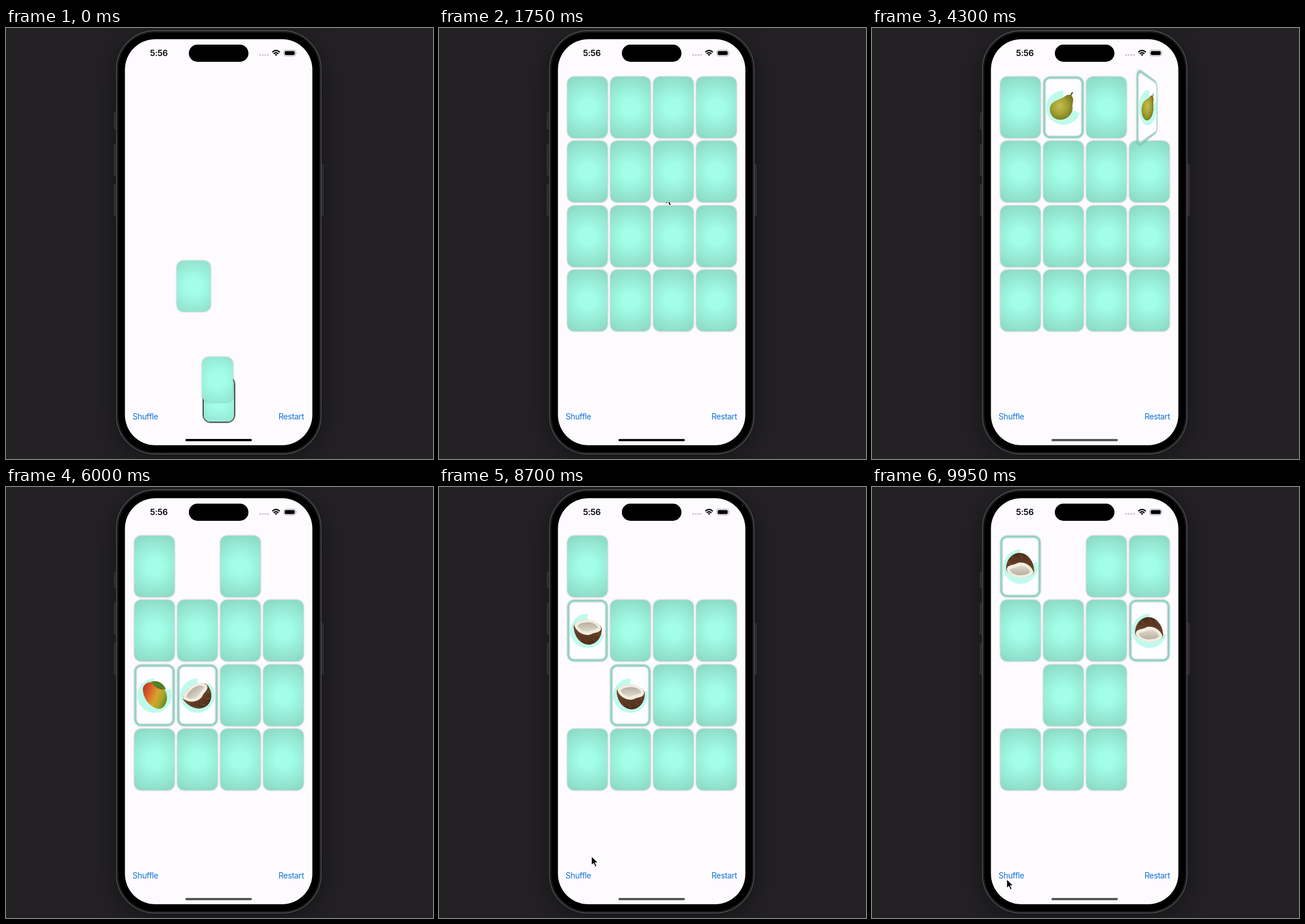
An HTML page that plays this animation: 745x752 px, repeating every 10 s.

```html
<!DOCTYPE html>
<html lang="en">
<head>
<meta charset="utf-8">
<title>Memory cards</title>
<style>
  html, body { margin: 0; width: 100%; height: 100%; overflow: hidden; background: #232124; }
  #stage { position: relative; width: 745px; height: 752px; overflow: hidden; }
  #stage > svg { position: absolute; left: 0; top: 0; }
  #glow { position: absolute; left: 193px; top: 5px; width: 356px; height: 738px; border-radius: 68px;
    box-shadow: 0 10px 50px rgba(0, 0, 0, .42); }
  text { font-family: Inter, Roboto, sans-serif; }
  .link { font-size: 14px; letter-spacing: -.33px; fill: #1173d4; }
  .card { position: absolute; border-radius: 12px; box-sizing: border-box;
    background: radial-gradient(circle, #a2fee7 14px, #89d4c1 65px);
    box-shadow: 0 0 3px rgba(0, 0, 0, .36); }
  .face { position: absolute; inset: 0; border-radius: 12px; box-sizing: border-box; overflow: hidden;
    border: 3.5px solid #8ad6c3; background: #fefdff; }
  .face::after { content: ""; position: absolute; inset: 0; border-radius: 8px;
    box-shadow: inset 0 0 3px rgba(0, 0, 0, .42); }
  .pie, .fruit { position: absolute; left: 50%; top: 50%; width: 60px; height: 60px; margin: -30px; }
  .pie { border-radius: 50%; }
  .fruit { overflow: visible; }
</style>
</head>
<body>
<div id="stage">
  <div id="glow"></div>
  <svg width="745" height="752">
    <defs>
      <linearGradient id="mangoSkin" x1="0" y1=".25" x2="1" y2=".75">
        <stop offset="0" stop-color="#c23a22"/><stop offset=".3" stop-color="#db6a2a"/>
        <stop offset=".55" stop-color="#d9a32c"/><stop offset=".78" stop-color="#a5a52a"/>
        <stop offset="1" stop-color="#5d7f1c"/>
      </linearGradient>
      <radialGradient id="pearSkin" cx=".42" cy=".45" r=".62">
        <stop offset="0" stop-color="#c2bd52"/><stop offset=".5" stop-color="#a5a233"/>
        <stop offset="1" stop-color="#74751b"/>
      </radialGradient>
      <linearGradient id="husk" x1="0" y1="0" x2="0" y2="1">
        <stop offset="0" stop-color="#805336"/><stop offset="1" stop-color="#4c2c1a"/>
      </linearGradient>
      <linearGradient id="hollow" x1="0" y1="0" x2="0" y2="1">
        <stop offset="0" stop-color="#b5b0a0"/><stop offset="1" stop-color="#ded9cb"/>
      </linearGradient>
      <g id="mango">
        <path d="M-20-8C-22-20-10-26 1-23C14-19 22-8 22 4C21 16 15 24 6 23C-4 21-18 10-20-8Z" fill="url(#mangoSkin)"/>
        <path d="M-6-24C4-28 15-23 20-11C9-9 2-14-6-24Z" fill="#4b7a22"/>
        <path d="M-6-24Q6-20 19-11" fill="none" stroke="#7da548" stroke-width=".8"/>
      </g>
      <g id="pear">
        <path d="M12-18Q13-23 16-27" fill="none" stroke="#67502c" stroke-width="2.4"/>
        <path d="M4-21C10-25 17-21 17-14C17-9 15-5 16 1C15 13 5 22-7 21C-19 20-26 9-23-2C-19-13-6-13 4-21Z" fill="url(#pearSkin)"/>
      </g>
      <g id="coconut" transform="rotate(-37)">
        <path d="M-24-9C-24 12-10 25 3 24C16 23 26 10 25-5C18-22-18-24-24-9Z" fill="url(#husk)"/>
        <path d="M-23-10C-18-20-8-18-1-20C10-20 22-14 24-5C23 4 13 2 6 6C-3 10-19 4-23-10Z" fill="#f0ece0"/>
        <path d="M-17-9C-12-15-5-14 2-15C11-14 17-11 19-5C14-2 8-2 3 1C-5 3-14-1-17-9Z" fill="url(#hollow)"/>
        <path d="M-17 11l7 7M-4 15l5 7M9 13l6 5M17 4l4 5" stroke="#8a6040" stroke-width=".8"/>
      </g>
    </defs>

    <g fill="#2b292c" stroke="#434145" stroke-width=".7">
      <rect x="188.5" y="148" width="8" height="28" rx="1.5"/>
      <rect x="188.5" y="203" width="8" height="54" rx="1.5"/>
      <rect x="188.5" y="273" width="8" height="54" rx="1.5"/>
      <rect x="545" y="238" width="8.5" height="89" rx="1.5"/>
    </g>
    <rect x="192.7" y="4.7" width="357" height="738.6" rx="67" fill="#19181a" stroke="#59585b" stroke-width="1.2"/>
    <rect x="196" y="8" width="350.5" height="732" rx="64"/>
    <rect x="207.5" y="19.5" width="327" height="708.5" rx="53" fill="#fdfbfe"/>
    <rect x="319" y="29" width="104" height="30" rx="15"/>

    <text x="251.3" y="49" font-size="14.6" font-weight="600" letter-spacing="-.3">5:56</text>
    <g fill="#c3c2c4">
      <circle cx="443.5" cy="47" r="1.6"/><circle cx="448" cy="47" r="1.6"/>
      <circle cx="452.5" cy="47" r="1.6"/><circle cx="457" cy="47" r="1.6"/>
    </g>
    <g fill="none" stroke="#000" stroke-width="2.1">
      <path d="M464.6 42.2Q471.2 36.2 477.8 42.2M467 45Q471.2 41.3 475.4 45"/>
      <path d="M468.9 46.3Q471.2 44.6 473.5 46.3L471.2 48.7Z" fill="#000" stroke="none"/>
    </g>
    <rect x="484.6" y="38.6" width="20.8" height="10.3" rx="3.4" fill="none" stroke="#a5a4a6"/>
    <rect x="486.3" y="40.2" width="17.4" height="7" rx="2"/>
    <path d="M506.4 42q1.6 1.7 0 3.6z" fill="#a5a4a6"/>

    <text class="link" x="220.8" y="683">Shuffle</text>
    <text class="link" x="475.4" y="683">Restart</text>
    <rect id="home" x="313" y="717" width="116" height="4" rx="2"/>
  </svg>
  <div id="cards"></div>
  <svg width="745" height="752">
    <path id="cursor" d="M0 0V16.2L3.8 12.7L6.4 18.8L9.2 17.6L6.6 11.7H11.8Z" stroke="#fff" stroke-width="1.2"/>
  </svg>
</div>
<script>
const LOOP = 10000, MOVE = 250, SPIN = 500, DEGREES_PER_MS = 0.12;
const DECK = { x: 345, y: 610, w: 52.5, h: 77 };
const SHUFFLE_AT = 9100, SHUFFLE_TIME = 300;
const shuffled = [5, 1, 8, 11, 7, 10, 3, 13, 15, 0, 2, 14, 4, 12, 6, 9];

// turns: [face up, face down] times; match and gone end the card's play
const play = {
  1: { fruit: 'pear', turns: [[3250]], match: 4152, gone: 5460 },
  3: { fruit: 'pear', turns: [[2680, 3250], [4152]], match: 4152, gone: 5460 },
  2: { fruit: 'mango', turns: [[2450, 3250], [6250]], match: 6750, gone: 7150 },
  8: { fruit: 'mango', turns: [[5460, 6250], [6750]], match: 6750, gone: 7150 },
  4: { fruit: 'coconut', turns: [[7150]], match: 8000 },
  9: { fruit: 'coconut', turns: [[5640, 6250], [8000]], match: 8000 }
};

// [time, x, y] of the pointer tip
const pointer = [
  [1150, 371, 646], [1900, 398, 260], [2380, 412, 162], [2500, 414, 160], [2660, 484, 158],
  [2850, 484, 158], [3200, 335, 160], [3350, 335, 160], [4050, 482, 162], [4160, 482, 164],
  [4300, 430, 172], [5380, 258, 368], [5480, 260, 368], [5620, 325, 362], [6020, 325, 362],
  [6220, 408, 160], [6330, 408, 160], [6700, 260, 366], [6800, 260, 366], [7080, 260, 258],
  [7250, 260, 258], [7900, 326, 364], [8080, 326, 364], [8700, 266, 644], [8930, 235, 684]
];

const clamp = (v, lo = 0, hi = 1) => Math.min(hi, Math.max(lo, v));
const mix = (a, b, p) => a + (b - a) * p;

// cubic-bezier(.42, 0, .58, 1)
function ease(u) {
  u = clamp(u);
  let lo = 0, hi = 1, s = 0.5;
  for (let i = 0; i < 20; i++) {
    s = (lo + hi) / 2;
    const x = 1.26 * s * (1 - s) ** 2 + 1.74 * s * s * (1 - s) + s ** 3;
    if (x < u) lo = s; else hi = s;
  }
  return s * s * (3 - 2 * s);
}

const cell = i => ({ x: 223.5 + i % 4 * 75, y: 84.5 + Math.floor(i / 4) * 112.5 });

const cards = shuffled.map((_, i) => {
  const el = document.createElement('div');
  el.className = 'card';
  el.style.zIndex = 16 - i;
  if (play[i]) {
    el.innerHTML = `<div class="face"><div class="pie"></div>
      <svg class="fruit" viewBox="-30 -30 60 60"><use href="#${play[i].fruit}"/></svg></div>`;
  }
  document.getElementById('cards').append(el);
  return { el, face: el.querySelector('.face'), pie: el.querySelector('.pie'), fruit: el.querySelector('.fruit') };
});

function drawCard(card, i, t) {
  const dealt = ease((t + 107.5 - 62.5 * i) / MOVE);
  const moved = ease((t - SHUFFLE_AT) / SHUFFLE_TIME);
  const from = cell(i), to = cell(shuffled[i]), style = card.el.style;
  style.left = mix(DECK.x, mix(from.x, to.x, moved), dealt) + 'px';
  style.top = mix(DECK.y, mix(from.y, to.y, moved), dealt) + 'px';
  style.width = mix(DECK.w, 70, dealt) + 'px';
  style.height = mix(DECK.h, 107, dealt) + 'px';
  if (!card.face) return;

  const { turns, match, gone = Infinity } = play[i];
  let open = 0, gap = 0;
  for (const [up, down = Infinity] of turns) {
    open += ease((t - up) / MOVE) - ease((t - down) / MOVE);
    gap += Math.max(0, Math.min(t, down, match) - up) * DEGREES_PER_MS;
  }
  const angle = 180 * (1 - open), size = 1 - ease((t - gone) / MOVE);
  const spin = Math.max(0, t - match - 150) % SPIN / SPIN * 360;
  style.display = size > 0.001 ? '' : 'none';
  style.transform = open > 0.0001 ? `perspective(132px) rotateY(${angle}deg) scale(${size})` : 'none';
  card.face.style.display = angle < 90 ? '' : 'none';
  card.pie.style.background = `conic-gradient(transparent ${gap}deg, #bffbec 0)`;
  card.fruit.style.transform = `rotate(${spin}deg)`;
}

function drawPointer(t) {
  const next = pointer.findIndex(k => k[0] > t);
  const b = pointer[next < 0 ? pointer.length - 1 : next];
  const a = next > 0 ? pointer[next - 1] : b;
  const p = a === b ? 0 : ease((t - a[0]) / (b[0] - a[0]));
  document.getElementById('cursor').setAttribute('transform', `translate(${mix(a[1], b[1], p)} ${mix(a[2], b[2], p)})`);
}

const start = performance.now();
function frame(now) {
  const t = Math.max(0, now - start) % LOOP;
  cards.forEach((card, i) => drawCard(card, i, t));
  drawPointer(t);
  const grey = 88 * clamp((t - 1700) / 250);
  document.getElementById('home').setAttribute('fill', `rgb(${grey},${grey},${grey})`);
  requestAnimationFrame(frame);
}
frame(start);
</script>
</body>
</html>
```
